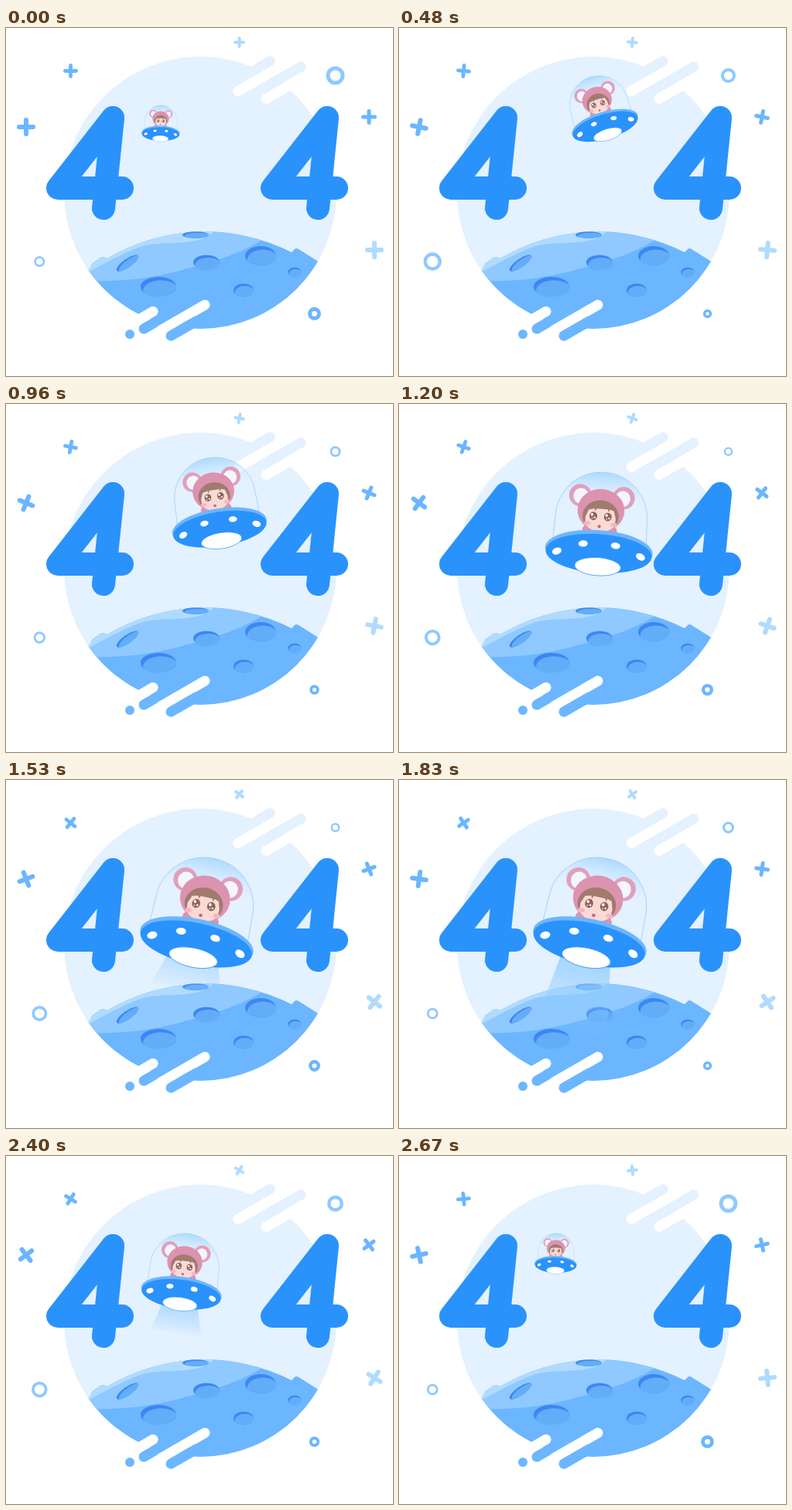
Animation, 500 px wide and 450 px high, one loop 2.7 s. Source, as an HTML page with a canvas:

```html
<!DOCTYPE html>
<html lang="en">
<head>
<meta charset="utf-8">
<title>404</title>
<style>
html, body { margin: 0; width: 100%; height: 100%; overflow: hidden; background: #fff; }
canvas { display: block; }
</style>
</head>
<body>
<canvas id="stage" width="500" height="450"></canvas>
<script>
const ctx = document.getElementById('stage').getContext('2d');
const LOOP = 2700;
const BLUE = '#2a92fb', MID = '#6bb6ff', SOFT = '#8fc9ff', PALE = '#b0dbff', SKY = '#e4f1ff';
const PINK = '#dc93b0', HAIR = '#a17b6e', SKIN = '#f9dad6';

// Linear interpolation through [position, value] stops; position runs from 0 to 1.
function keyed(p, stops) {
  const i = Math.max(1, stops.findIndex(s => s[0] >= p));
  const [p0, v0] = stops[i - 1], [p1, v1] = stops[i];
  return v0 + (v1 - v0) * (p - p0) / (p1 - p0);
}

const triangle = (t, period) => 1 - Math.abs(1 - 2 * (t % period) / period);

function ellipse(x, y, rx, ry, fill, angle = 0) {
  ctx.beginPath();
  ctx.ellipse(x, y, rx, ry, angle * Math.PI / 180, 0, 2 * Math.PI);
  ctx.fillStyle = fill;
  ctx.fill();
}

function line(color, width, ...points) {
  ctx.beginPath();
  points.forEach(([x, y]) => ctx.lineTo(x, y));
  ctx.lineCap = ctx.lineJoin = 'round';
  ctx.strokeStyle = color;
  ctx.lineWidth = width;
  ctx.stroke();
}

function fillPath(d, fill) {
  ctx.fillStyle = fill;
  ctx.fill(new Path2D(d));
}

function fade(y0, y1, from, to) {
  const g = ctx.createLinearGradient(0, y0, 0, y1);
  g.addColorStop(0, from);
  g.addColorStop(1, to);
  return g;
}

function placed(x, y, angle, scale, draw) {
  ctx.save();
  ctx.translate(x, y);
  ctx.rotate(angle * Math.PI / 180);
  ctx.scale(scale, scale);
  draw();
  ctx.restore();
}

function crater(x, y, rx, ry, angle = 0) {
  placed(x, y, angle, 1, () => {
    ellipse(0, 0, rx, ry, '#3c87f3');
    ctx.clip();
    ellipse(rx * 0.14, ry * 0.36, rx, ry, '#63adf8');
  });
}

function planet() {
  const surface = 'M100 324L110 308Q110 306 112 304L122 297Q125 295 128 297L131 298A247 247 0 0 1 369 290L373 286Q375 284 378 286L410 306';
  ctx.save();
  ellipse(251, 213, 176, 176, SKY);
  ctx.clip();
  fillPath(surface + 'V400H100Z', MID);
  ctx.save();
  ctx.clip(new Path2D(surface + 'V400H100Z'));
  fillPath('M95 326Q160 331 220 315C265 303 300 294 338 270V240H95Z', SOFT);
  fillPath('M95 322Q150 291 176 282C205 274 245 284 268 264V240H95Z', PALE);
  ctx.restore();
  crater(157, 304, 17, 5.5, -35);
  crater(245, 267.5, 17, 4.3);
  crater(259, 303, 17, 9.5);
  crater(329, 294.5, 20, 12.5);
  crater(197, 334.5, 23, 12.8);
  crater(307, 339, 13, 8.5);
  crater(373, 315.5, 8.7, 6);
  ctx.restore();
}

function streaks() {
  line(SKY, 13, [341, 43], [302, 65.5]);
  line('#fff', 13, [300, 81.5], [348, 53.8]);
  line(SKY, 13, [381, 50], [344, 71.4]);
  line('#fff', 13, [336, 91.5], [378, 67.3]);
  line('#fff', 13, [190, 366.5], [150, 389.6]);
  line(MID, 13, [178, 389], [206, 372.8]);
  line('#fff', 13, [257, 358], [200, 391]);
  line(MID, 13, [213, 398], [246, 379]);
  ellipse(160, 396, 6, 6, MID);
}

function four(x) {
  line(BLUE, 30, [x + 126, 233], [x + 138, 116], [x + 67, 207], [x + 150, 207]);
}

function cross(x, y, size, width, color, angle) {
  const r = (size - width) / 2;
  placed(x, y, angle, 1, () => {
    line(color, width, [-r, 0], [r, 0]);
    line(color, width, [0, -r], [0, r]);
  });
}

function ring(x, y, outer, thickness, color, scale) {
  ctx.beginPath();
  ctx.arc(x, y, (outer - thickness / 2) * scale, 0, 2 * Math.PI);
  ctx.strokeStyle = color;
  ctx.lineWidth = thickness * scale;
  ctx.stroke();
}

function pilot() {
  ellipse(-1, 8, 24, 12, PINK);
  for (const x of [-31, 29]) {
    ellipse(x, -39, 15.5, 15.5, '#dfa0bc');
    ellipse(x + (x < 0 ? 1 : -1), -38, 10.5, 11, '#f5f6fd');
  }
  ellipse(-1, -20, 32.5, 29.5, PINK);
  ctx.save();
  ellipse(-1, -12, 25, 22, HAIR);
  ctx.clip();
  fillPath('M-21 12L-22 -10L-18 -20L-10 -22L-9 -18L-7 -22L8 -22L10 -18L11 -22L17 -20L20 -10L19 12Z', SKIN);
  ctx.restore();
  for (const x of [-19, 18]) ellipse(x, -1, 4.5, 3, '#f7b6c2');
  for (const x of [-11, 9]) {
    ellipse(x, -11.5, 5.3, 5.8, '#8d6258');
    ellipse(x - 1.8, -13.5, 1.8, 2, '#fff');
    ellipse(x + 2, -9.5, 1.3, 1.3, '#fff');
    ellipse(x - 1.5, -8.5, 1, 1, '#f3d0cb');
  }
  ellipse(-2, 2.5, 2.3, 2.2, '#c8676f');
}

function saucer(beam) {
  if (beam > 0) {
    ctx.save();
    ctx.translate(0, 58);
    ctx.scale(1, beam);
    ctx.globalAlpha = Math.min(1, beam * 1.5);
    fillPath('M-32 0H32L47 97H-47Z', fade(0, 97, 'rgba(150,208,255,.85)', 'rgba(135,197,255,.05)'));
    ctx.restore();
  }
  const dome = 'M-65 34L-63.5 -10A63.5 63 0 0 1 63.5 -10L65 34';
  fillPath(dome, fade(-73, -28, 'rgba(165,215,255,.9)', 'rgba(215,236,255,0)'));
  pilot();
  ctx.strokeStyle = '#a3d4fc';
  ctx.lineWidth = 1;
  ctx.stroke(new Path2D(dome));
  ellipse(0, 36, 74.5, 28.5, MID);
  ellipse(0, 39.8, 73.5, 27, BLUE);
  for (const side of [-1, 1]) {
    ellipse(58 * side, 40.5, 6.7, 4.7, '#fff', 25 * side);
    ellipse(22.5 * side, 27.6, 6.5, 4.4, '#fff', 6 * side);
  }
  ellipse(0, 58, 32, 12.5, '#fff');
  ctx.strokeStyle = BLUE;
  ctx.lineWidth = 0.8;
  ctx.stroke();
}

function frame() {
  const t = performance.now() % LOOP, p = t / LOOP;
  const flight = (start, turn, end) =>
    keyed(p, [[0, start], [0.25, turn], [0.5, end], [0.8, end], [1, start]]);
  const spin = (slow, fast, full) =>
    keyed(p, [[0, 0], [0.4, slow], [0.8, fast], [1, full]]);
  const wide = spin(25, 130, 360), narrow = spin(12, 75, 180);

  ctx.clearRect(0, 0, 500, 450);
  planet();
  streaks();
  four(0);
  four(277);

  cross(26, 128, 24, 6, MID, wide);
  cross(469, 115, 20, 5, MID, wide);
  cross(83.5, 55.5, 19, 4.8, MID, narrow);
  cross(476, 287, 24, 6, PALE, narrow);
  cross(301.5, 18.5, 15, 4, PALE, narrow);

  ring(425.5, 61.5, 12, 5, SOFT, 1 - 0.58 * triangle(t, LOOP));
  ring(43.3, 302, 12, 4.5, SOFT, 0.58 + 0.42 * triangle(t, LOOP / 3));
  ring(398.5, 369.5, 8.5, 5, MID, 1 - 0.47 * triangle(t, LOOP / 2));

  const beam = keyed(p, [[0, 0], [0.5, 0], [0.65, 1], [0.8, 1], [1, 0]]);
  placed(flight(200, 284, 254), flight(124, 97, 173), flight(1.5, -24, 12),
    flight(0.33, 0.7, 1), () => saucer(beam));
  requestAnimationFrame(frame);
}
frame();
</script>
</body>
</html>
```
